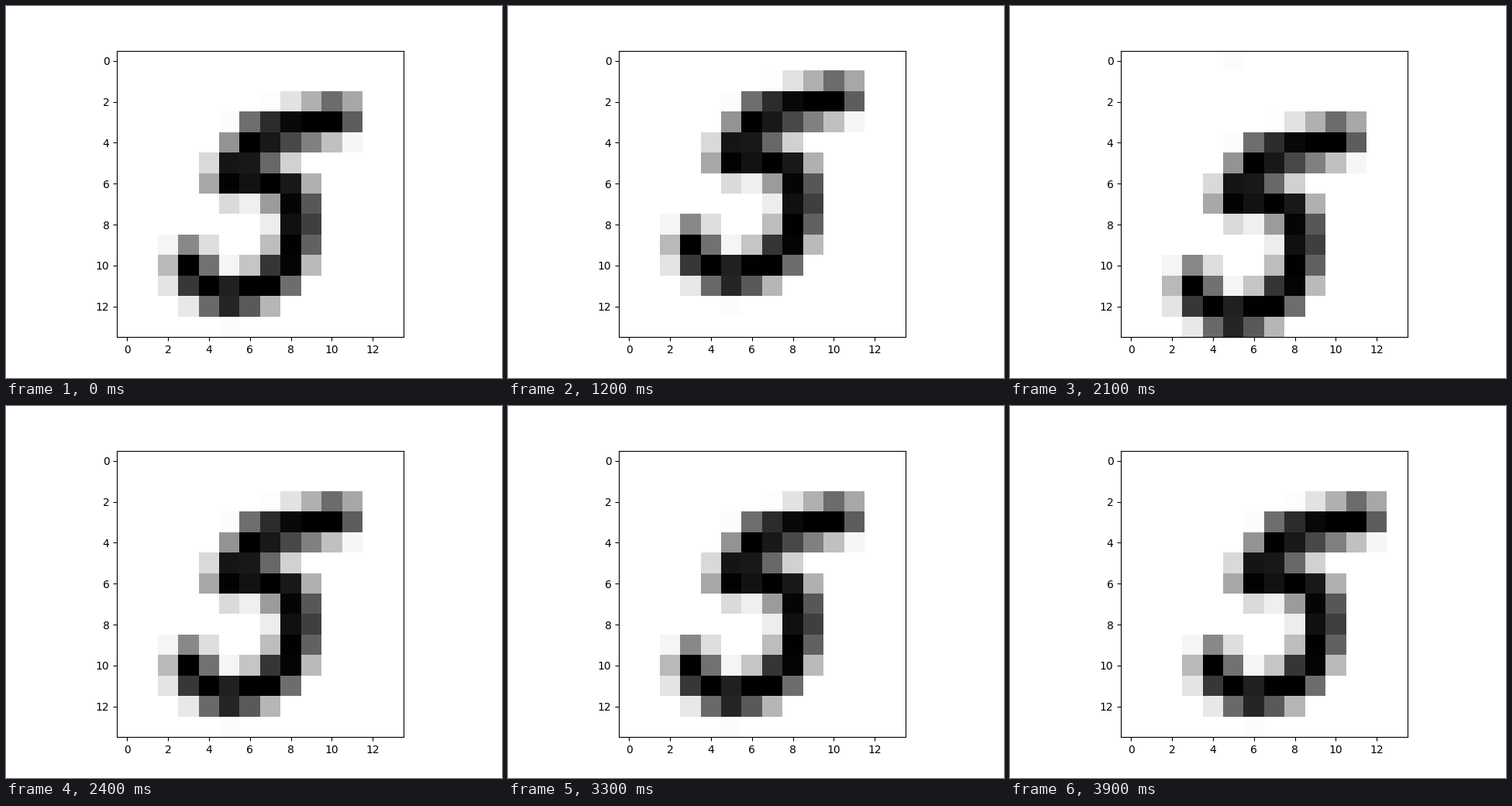
Write a matplotlib script that moves like this. It is 640 px wide and 480 px high and loops after 4.2 s.

```python
import matplotlib.pyplot as plt
import numpy as np
from matplotlib.animation import FuncAnimation

SIZE = 14
STEP_MS = 300
CORE, EDGE = 0.15, 1.6  # pen radius of full ink and of no ink

# Pen path of the handwritten five: (column, row)
PEN_PATH = [
    (10.3, 2.75), (9, 3.1), (7, 3.55), (6.3, 3.75),        # top bar
    (5, 5.75), (6, 5.6), (7.1, 5.82),                      # stem and shoulder
    (8.25, 6.75), (8.38, 8), (8.2, 9.2), (7.3, 10.6),      # belly
    (6.2, 11.2), (5, 11.5), (4.1, 11.2), (3.1, 10.3), (3.1, 9.9),
]

# (row, column) shifts: up, down, left, right
SHIFTS = [(-1, 0), (1, 0), (0, -1), (0, 1)]
CYCLE = 3               # two steps at rest, then one shifted
LEAD = 2                # extra rest at the start
STEPS = LEAD + CYCLE * len(SHIFTS)


def segment_distance(points, a, b):
    along = b - a
    t = np.clip((points - a) @ along / (along @ along), 0, 1)
    return np.linalg.norm(points - a - t[..., None] * along, axis=-1)


def draw_digit():
    cells = np.stack(np.meshgrid(np.arange(SIZE), np.arange(SIZE)), axis=-1)
    path = np.array(PEN_PATH)
    distance = np.min([segment_distance(cells, a, b)
                       for a, b in zip(path, path[1:])], axis=0)
    t = np.clip((EDGE - distance) / (EDGE - CORE), 0, 1)
    return t * t * (3 - 2 * t)


def shift_at(step):
    move, phase = divmod(step - LEAD, CYCLE)
    return SHIFTS[move] if move >= 0 and phase == CYCLE - 1 else (0, 0)


digit = draw_digit()

fig, ax = plt.subplots(figsize=(6.4, 4.8), dpi=100)
image = ax.imshow(digit, cmap="gray_r", vmin=0, vmax=1,
                  interpolation="nearest")


def update(step):
    image.set_data(np.roll(digit, shift_at(step), axis=(0, 1)))
    return [image]


anim = FuncAnimation(fig, update, frames=STEPS, interval=STEP_MS,
                     repeat=True, repeat_delay=0)
plt.show()
```
